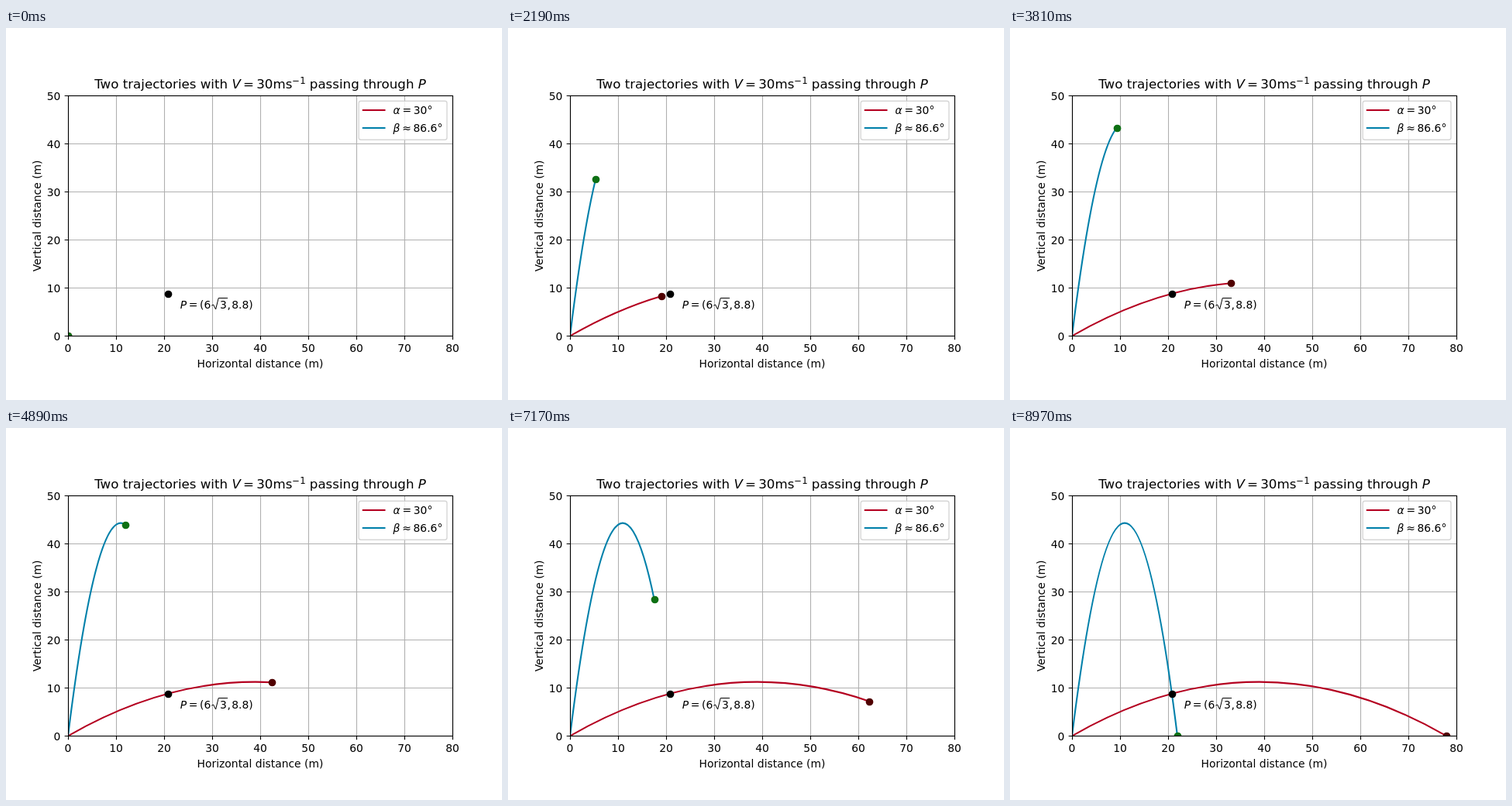
Write an HTML page that moves like this. It is 640 px wide and 480 px high and loops after 9000 ms.

```html
<!DOCTYPE html>
<html lang="en">
<head>
<meta charset="utf-8">
<title>Two trajectories</title>
<style>
  html, body { margin: 0; width: 100%; height: 100%; overflow: hidden; background: #fff; }
  svg { display: block; width: 640px; height: 480px; }
  text { font: 13.89px "DejaVu Sans", sans-serif; white-space: pre; }
  .title { font-size: 16.67px; }
  .sup { font-size: 11.67px; }
  i, .it { font-style: italic; }
  .mid { text-anchor: middle; }
  .end { text-anchor: end; }
  .grid { stroke: #b0b0b0; stroke-width: 1.11; }
  .axis { stroke: #000; stroke-width: 1.11; fill: none; }
  .curve { fill: none; stroke-width: 2.08; stroke-linecap: square; }
  .red { stroke: #b40020; }
  .blue { stroke: #0080aa; }
</style>
</head>
<body>
<svg viewBox="0 0 640 480">
  <clipPath id="plot"><rect x="80" y="87" width="496" height="310"/></clipPath>
  <path id="grid" class="grid"/>
  <g clip-path="url(#plot)">
    <path id="lowPath" class="curve red"/>
    <path id="highPath" class="curve blue"/>
    <circle id="lowDot" r="4.86" fill="#500000"/>
    <circle id="highDot" r="4.86" fill="#0e7014"/>
    <circle cx="209.5" cy="343.5" r="4.86"/>
  </g>
  <path id="ticks" class="axis"/>
  <rect class="axis" x="80.5" y="87.5" width="496" height="310"/>
  <g id="labels"></g>

  <text class="mid" x="328" y="438">Horizontal distance (m)</text>
  <text class="mid" transform="translate(44.5 242.4) rotate(-90)">Vertical distance (m)</text>
  <text class="title mid" x="328" y="78">Two trajectories with <tspan class="it">V</tspan><tspan dx="3.25">=</tspan><tspan dx="3.25">30ms</tspan><tspan class="sup" dy="-6.4">−1</tspan><tspan dy="6.4"> passing through </tspan><tspan class="it">P</tspan></text>

  <text x="224.7" y="362"><tspan class="it">P</tspan><tspan dx="2.7">=</tspan><tspan dx="2.7">(6</tspan><tspan x="276">3</tspan><tspan x="285.4">,</tspan><tspan x="291.2">8.8)</tspan></text>
  <path d="M265.3 358.2L267.6 357L270.6 363L274.2 348.5H286" fill="none" stroke="#000"/>

  <rect x="455.2" y="94.3" width="113.8" height="50" rx="2.78" fill="#fff" fill-opacity=".8" stroke="#ccc" stroke-opacity=".8" stroke-width="1.39"/>
  <path class="curve red" d="M460.8 106H488.5"/>
  <path class="curve blue" d="M460.8 129H488.5"/>
  <text x="499.6" y="111"><tspan class="it">α</tspan><tspan dx="2.7">=</tspan><tspan dx="2.7">30°</tspan></text>
  <text x="499.6" y="134"><tspan class="it">β</tspan><tspan dx="2.7">≈</tspan><tspan dx="2.7">86.6°</tspan></text>
</svg>
<script>
  const STEP = 30, COUNT = 300, SCALE = 6.2, SPEED = 30, G = 10;
  const el = id => document.getElementById(id);
  const px = x => 80 + SCALE * x;
  const py = y => 397.4 - SCALE * y;
  const snap = v => Math.floor(v + 0.5) + 0.5;

  function drawAxes() {
    let grid = '', ticks = '', labels = '';
    for (let v = 0; v <= 80; v += 10) {
      const x = snap(px(v));
      grid += `M${x} 87V397`;
      ticks += `M${x} 397.5v4.86`;
      labels += `<text class="mid" x="${px(v)}" y="418">${v}</text>`;
    }
    for (let v = 0; v <= 50; v += 10) {
      const y = snap(py(v));
      grid += `M80 ${y}H576`;
      ticks += `M80.5 ${y}h-4.86`;
      labels += `<text class="end" x="70.3" y="${Math.round(py(v) + 5.3)}">${v}</text>`;
    }
    el('grid').setAttribute('d', grid);
    el('ticks').setAttribute('d', ticks);
    el('labels').innerHTML = labels;
  }

  // Slopes of the two launches that pass through P = (12√3, 8.8)
  const PX = 12 * Math.sqrt(3), PY = 8.8;
  const drop = G * PX * PX / (2 * SPEED * SPEED);
  const root = Math.sqrt(PX * PX - 4 * drop * (drop + PY));
  const shots = [['low', -1], ['high', 1]].map(([name, sign]) => {
    const slope = (PX + sign * root) / (2 * drop);
    const range = 2 * SPEED * SPEED * slope / (G * (1 + slope * slope));
    return { path: el(name + 'Path'), dot: el(name + 'Dot'), slope, range };
  });

  // A partial parabola is exactly one quadratic curve
  function drawShot({ path, dot, slope, range }, u) {
    const x = range * u, y = slope * x * (1 - u);
    path.setAttribute('d',
      `M${px(0)} ${py(0)}Q${px(x / 2)} ${py(slope * x / 2)} ${px(x)} ${py(y)}`);
    dot.setAttribute('cx', snap(px(x)));
    dot.setAttribute('cy', snap(py(y)));
  }

  const start = performance.now();
  function tick() {
    const step = Math.floor((performance.now() - start) / STEP) % COUNT;
    shots.forEach(shot => drawShot(shot, step / (COUNT - 1)));
    requestAnimationFrame(tick);
  }

  drawAxes();
  tick();
</script>
</body>
</html>
```
